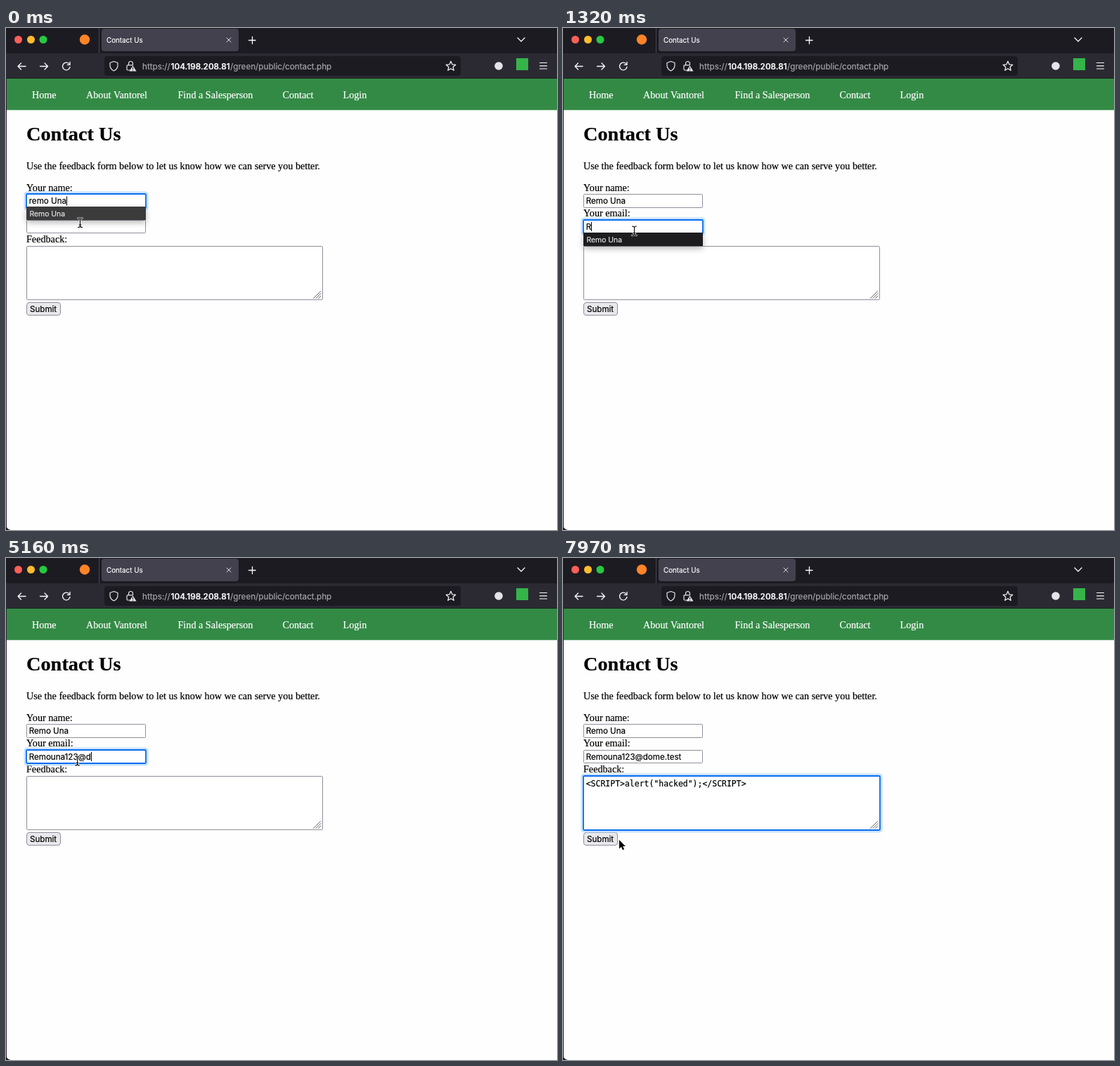
Animation, 784 px wide and 714 px high, one loop 8000 ms. Source, as an HTML page with a canvas:

```html
<!DOCTYPE html>
<html lang="en">
<head>
<meta charset="utf-8">
<title>Contact Us</title>
<style>
html, body { margin: 0; width: 100%; height: 100%; overflow: hidden; background: #fff; }
canvas { display: block; }
</style>
</head>
<body>
<canvas id="stage" width="784" height="714"></canvas>
<script>
const ctx = document.getElementById('stage').getContext('2d');
const LOOP = 8000;
const SERIF = '"Liberation Serif", serif';
const SANS = 'Inter, sans-serif';
const MONO = '"DejaVu Sans Mono", monospace';
const BODY = '14.17px ' + SERIF;
const FIELD = '11.6px ' + SANS;
const CODE = '11.48px ' + MONO;
const LIGHT = '#fbfbfe';
const ICON = '#e4e4e8';
const BORDER = '#8f8f9d';

const NAME = 'Remo Una';
const EMAIL = 'Remouna123@dome.test';
const SCRIPT = '<SCRIPT>alert("hacked");<\/SCRIPT>';

// Time at which each character of the email appears
const KEYS = [1320, 1470, 1610, 1910, 2350, 2500, 2640, 3380, 3680, 3820,
  4120, 5160, 5310, 5460, 5900, 6050, 6200, 6340, 6490, 6640];
// Spans in which the caret is blinked off
const BLINKS = [[3090, 3380], [4720, 5160], [7090, 7370], [7970, LOOP]];
// Pointer positions: time, x, y
const POINTER = [[0, 105, 277], [140, 103, 280], [290, 100, 284], [440, 99, 285],
  [740, 100, 287], [880, 101, 288.5], [6940, 106, 293], [7090, 123, 308], [7230, 132, 316], [7970, 80, 401]];

// A hairline stroke gives the slightly heavier smoothing of the desktop
function text(str, x, y, font, color = '#000') {
  ctx.font = font;
  ctx.fillStyle = ctx.strokeStyle = color;
  ctx.lineWidth = 0.2;
  ctx.fillText(str, x, y);
  ctx.strokeText(str, x, y);
}

function rect(x, y, w, h, color) {
  ctx.fillStyle = color;
  ctx.fillRect(x, y, w, h);
}

function round(x, y, w, h, r, fill, stroke, width = 1) {
  ctx.beginPath();
  ctx.roundRect(x, y, w, h, r);
  if (fill) { ctx.fillStyle = fill; ctx.fill(); }
  if (stroke) { ctx.strokeStyle = stroke; ctx.lineWidth = width; ctx.stroke(); }
}

function dot(x, y, r, color) {
  ctx.beginPath();
  ctx.arc(x, y, r, 0, Math.PI * 2);
  ctx.fillStyle = color;
  ctx.fill();
}

function fill(d, color) {
  ctx.fillStyle = color;
  ctx.fill(new Path2D(d));
}

function path(d, color, width = 1.3) {
  ctx.strokeStyle = color;
  ctx.lineWidth = width;
  ctx.lineCap = ctx.lineJoin = 'round';
  ctx.stroke(new Path2D(d));
}

function tabStrip() {
  rect(0, 0, 784, 36, '#1c1b22');
  dot(17.5, 16.5, 5.5, '#ff5f57');
  dot(35.5, 16.5, 5.5, '#febc2e');
  dot(53, 16.5, 5.5, '#28c840');
  dot(112, 16.5, 7.2, '#ff8427');
  rect(132, 0, 1, 36, '#47464f');
  round(136, 1, 195, 32, 4, '#42414d');
  text('Contact Us', 143, 21, '9.8px ' + SANS, LIGHT);
  path('M314 14l6 6M320 14l-6 6', '#dcdce0', 1);
  path('M345.5 17.5h9.5M350.5 12.5v10', LIGHT);
  path('M728 14l5 5l5-5', LIGHT);
}

function toolbar() {
  rect(0, 36, 784, 35, '#2b2a33');
  rect(0, 71, 784, 1, '#17251c');
  path('M28 54.5H17M21.5 50L17 54.5L21.5 59', LIGHT);
  path('M48.5 54.5H59.5M55 50L59.5 54.5L55 59', LIGHT);
  path('M90.2 51.5A5.3 5.3 0 1 0 91 55.5M91 48.5V52.3H87.2', LIGHT);

  round(140, 40, 507, 28, 4, '#1c1b22');
  path('M153.5 47.5L159 49.5V53C159 57 156.5 59.5 153.5 61C150.5 59.5 148 57 148 53V49.5Z', ICON, 1.2);
  path('M174.5 52.5V50.5A3 3 0 0 1 180.5 50.5V52.5M178 60H173.2Q172 60 172 58.8V54Q172 52.8 173.2 52.8H180', ICON, 1.2);
  fill('M180.5 53.5L185.5 61.5H175.5Z', ICON);
  rect(180, 56, 1, 3, '#1c1b22');
  rect(180, 60, 1, 1, '#1c1b22');

  const url = '11.7px ' + SANS;
  text('https://', 194, 58.5, url, '#a5a5ac');
  text('104.198.208.81', 234.5, 58.5, '600 ' + url, LIGHT);
  text('/green/public/contact.php', 319, 58.5, url, '#a5a5ac');

  star(633, 54.5, 7.2, 3.3);
  dot(701, 54, 5.8, ICON);
  rect(726, 43, 17, 17, '#35b44a');
  path('M759.5 49.5h10M759.5 53.8h10M759.5 58h10', LIGHT, 1.2);
}

function star(x, y, outer, inner) {
  ctx.beginPath();
  for (let i = 0; i < 10; i++) {
    const a = -Math.PI / 2 + i * Math.PI / 5;
    const r = i % 2 ? inner : outer;
    ctx.lineTo(x + r * Math.cos(a), y + r * Math.sin(a));
  }
  ctx.closePath();
  ctx.strokeStyle = LIGHT;
  ctx.lineWidth = 1.2;
  ctx.lineJoin = 'round';
  ctx.stroke();
}

function page() {
  rect(0, 72, 784, 642, '#fefefe');
  rect(0, 72, 784, 44.7, '#338a45');
  const nav = [['Home', 37], ['About Vantorel', 114], ['Find a Salesperson', 244.5], ['Contact', 393.5], ['Login', 479.5]];
  for (const [label, x] of nav) text(label, x, 99.5, BODY, '#fff');
  text('Contact Us', 29, 159.5, 'bold 28.34px ' + SERIF);
  text('Use the feedback form below to let us know how we can serve you better.', 29, 200.5, BODY);
  text('Your name:', 29, 231.5, BODY);
  text('Your email:', 29, 268, BODY);
  text('Feedback:', 29, 304.5, BODY);
  round(29.5, 390.5, 48, 18, 3.5, '#e9e9ed', BORDER);
  text('Submit', 34, 404, FIELD);
  rect(0, 72, 1, 642, '#2a2038');
  fill('M0 707Q1 713 7 714H0Z', '#1c1b22');
}

function box(x, y, w, h, focused, border = BORDER) {
  if (focused) {
    round(x - 3.5, y - 3.5, w + 7, h + 7, 4.5, '#c6e2fd');
    round(x, y, w, h, 1.5, '#fff', '#0a6cf0', 1.8);
  } else {
    round(x + 0.5, y + 0.5, w - 1, h - 1, 1, '#fff', border);
  }
}

function entry(str, y, font, caret) {
  text(str, 32.7, y, font);
  if (caret) rect(Math.round(32.7 + ctx.measureText(str).width), y - 10.5, 1, 13, '#000');
}

function grip() {
  path('M437.5 384.5L447.5 374.5M441 384.5L448 377.5M444.5 384.5L448 381', '#66666c', 1);
}

function suggestion(y, color) {
  ctx.save();
  ctx.shadowColor = 'rgba(0,0,0,.28)';
  ctx.shadowBlur = 9;
  ctx.shadowOffsetY = 4;
  rect(29, y, 170, 19, color);
  ctx.restore();
  text(NAME, 33.5, y + 13.5, '10.4px ' + SANS, '#e2e2e2');
}

function beam(x, y) {
  ctx.save();
  ctx.translate(x + 0.5, y);
  const d = 'M-3-6.5Q0-6.5 0-4.5Q0-6.5 3-6.5M0-4.5V4.5M-3 6.5Q0 6.5 0 4.5Q0 6.5 3 6.5M-1.5 3H1.5';
  path(d, 'rgba(255,255,255,.85)', 2.6);
  path(d, '#000', 1.1);
  ctx.restore();
}

function arrow(x, y) {
  const d = `M${x} ${y}v12.5l2.9-2.7l2 4.5l2.2-1l-2-4.3h3.8z`;
  path(d, '#fff', 2);
  fill(d, '#000');
}

function draw(t) {
  const focus = t < 740 ? 'name' : t < 7370 ? 'email' : 'feedback';
  const blink = !BLINKS.some(([from, to]) => t >= from && t < to);
  const caret = field => focus === field && blink;
  const typed = KEYS.filter(k => k <= t).length;

  page();
  box(29, 236, 170, 20, focus === 'name');
  box(29, 273, 170, 19, focus === 'email');
  box(29, 310, 422, 77, focus === 'feedback', t >= 7230 ? '#5f5f6e' : BORDER);
  grip();
  entry(t < 140 ? 'remo Una' : NAME, 250, FIELD, caret('name'));
  entry(EMAIL.slice(0, typed), 286.5, FIELD, caret('email'));
  entry(t < 7670 ? '' : SCRIPT, 324.5, CODE, caret('feedback'));
  if (t < 140) suggestion(254, '#3b3b3b');
  if (typed > 0 && typed < 5) suggestion(291, '#1d1d1f');

  tabStrip();
  toolbar();
  const [start, x, y] = POINTER.filter(p => p[0] <= t).pop();
  (start === 7970 ? arrow : beam)(x, y);
}

function tick() {
  draw(performance.now() % LOOP);
  requestAnimationFrame(tick);
}
tick();
</script>
</body>
</html>
```
